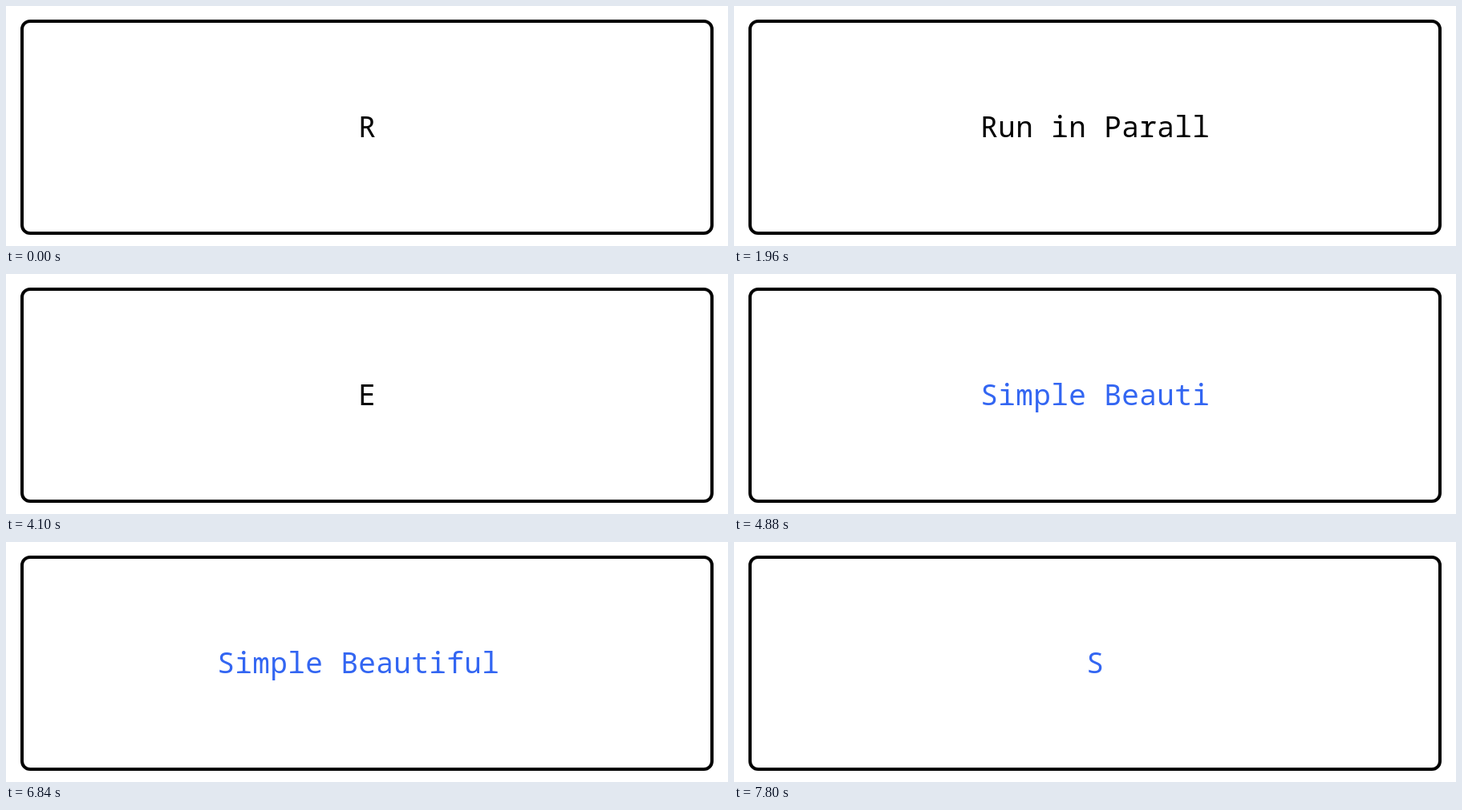
An HTML page with a canvas that plays this animation: 900x300 px, repeating every 7.86 s.

```html
<!DOCTYPE html>
<html lang="en">
<head>
<meta charset="utf-8">
<title>Typing banner</title>
<style>
  html, body { margin: 0; width: 100%; height: 100%; overflow: hidden; background: #fff; }
  canvas { display: block; width: 900px; height: 300px; }
</style>
</head>
<body>
<canvas id="stage" width="900" height="300"></canvas>
<script>
const ctx = document.getElementById('stage').getContext('2d');

const STEP = 60;      // ms per typed or deleted character
const HOLD = 1060;    // ms a complete line stays
const CELL = 22;      // character grid
const CENTER = 450;
const BASELINE = 163.6;

const lines = [
  { text: 'Run in Parallel', color: '#000' },
  { text: 'Epic', color: '#000' },
  { text: 'Simple Beautiful Modern', color: '#3366f2' }
];

const typeTime = line => (line.text.length - 1) * STEP;
const lineTime = line => 2 * typeTime(line) + HOLD;
const LOOP = lines.reduce((sum, line) => sum + lineTime(line), 0);

// Number of characters visible at time t within a line's turn.
function visibleCount(line, t) {
  const full = typeTime(line);
  if (t < full) return 1 + Math.floor(t / STEP);
  if (t < full + HOLD) return line.text.length;
  return line.text.length - 1 - Math.floor((t - full - HOLD) / STEP);
}

function drawFrame() {
  ctx.fillStyle = '#fff';
  ctx.fillRect(0, 0, 900, 300);
  ctx.strokeStyle = '#000';
  ctx.lineWidth = 4;
  ctx.beginPath();
  ctx.roundRect(20, 19, 860, 265, 10);
  ctx.stroke();
}

function drawText(text, color) {
  ctx.font = '36px "Noto Sans Mono", monospace';
  ctx.textAlign = 'center';
  ctx.fillStyle = color;
  const left = CENTER - text.length * CELL / 2;
  [...text].forEach((ch, i) => ctx.fillText(ch, left + (i + 0.5) * CELL, BASELINE));
}

function render(time) {
  let t = time % LOOP;
  let i = 0;
  while (t >= lineTime(lines[i])) t -= lineTime(lines[i++]);
  const { text, color } = lines[i];
  drawFrame();
  drawText(text.slice(0, visibleCount(lines[i], t)), color);
}

const start = performance.now();
function tick() {
  render(performance.now() - start);
  requestAnimationFrame(tick);
}
tick();
</script>
</body>
</html>
```
